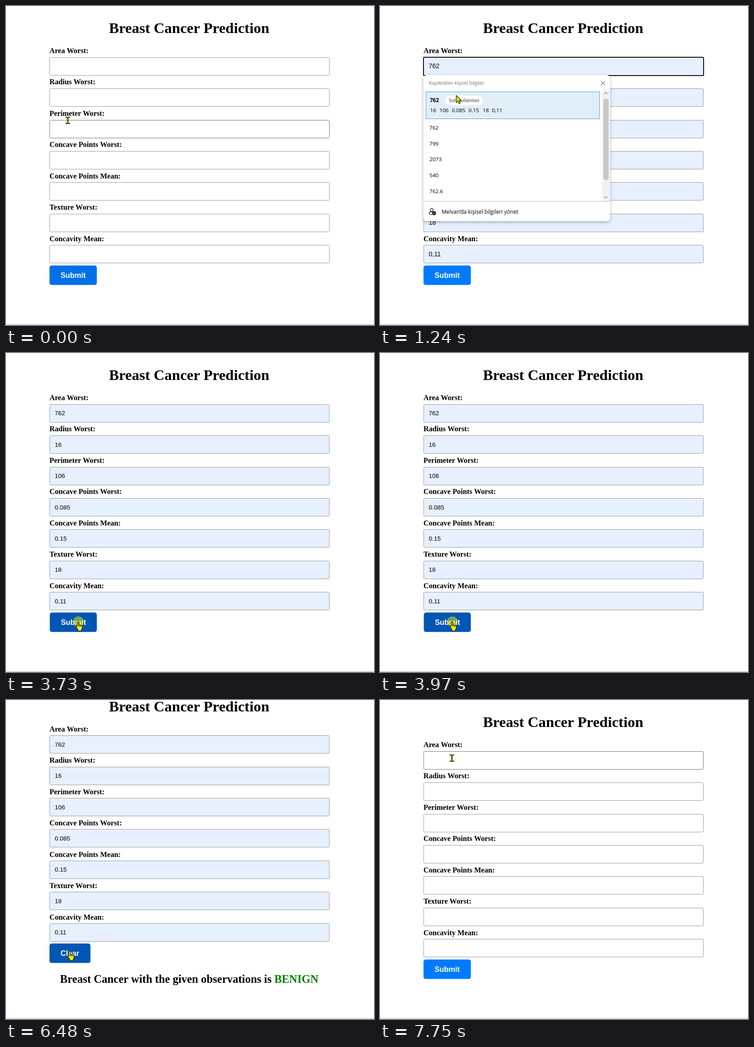
Recreate the animation shown at these times as an HTML page. Size 804 by 697 pixels, loop 8000 ms.

```html
<!DOCTYPE html>
<html lang="en">
<head>
<meta charset="utf-8">
<title>Breast Cancer Prediction</title>
<style>
  html, body { margin: 0; width: 100%; height: 100%; overflow: hidden; background: #fff; }
  svg { display: block; width: 804px; height: 697px; }
  .serif { font-family: "Liberation Serif", "Times New Roman", serif; font-weight: 700; fill: #000; }
  .sans { font-family: "Liberation Sans", Arial, sans-serif; }
  .ui { font-family: "Open Sans", "Noto Sans", sans-serif; font-size: 11.6px; fill: #000; }
  .button { font-size: 16.2px; font-weight: 700; fill: #fff; }
  .line { fill: none; stroke: #222; stroke-width: 1; }
</style>
</head>
<body>
<svg viewBox="0 0 804 697" xmlns="http://www.w3.org/2000/svg">
  <defs>
    <filter id="shadow" x="-10%" y="-10%" width="120%" height="120%">
      <feDropShadow dx="0" dy="2.5" stdDeviation="3.5" flood-opacity=".3"/>
    </filter>
  </defs>

  <text id="title" class="serif" x="400.2" text-anchor="middle" font-size="32.5">Breast Cancer Prediction</text>
  <g id="rows"></g>
  <g id="button">
    <rect x="95" width="103.5" height="42.6" rx="5"/>
    <text class="sans button" x="119.3" y="27"></text>
  </g>
  <text id="result" class="serif" x="400.4" y="618" text-anchor="middle" font-size="24.45">Breast Cancer with the given observations is <tspan fill="#008000">BENIGN</tspan></text>
  <rect y="695.5" width="804" height="1.5" fill="#c6c6c6"/>

  <g id="popup">
    <rect x="95" y="151" width="407.5" height="319" rx="7" fill="#fff" filter="url(#shadow)"/>
    <text class="ui" x="107" y="172" style="font-size:10.45px;fill:#707070">Kaydedilen kişisel bilgiler</text>
    <path class="line" d="M482.5 164l9 9m0-9l-9 9"/>
    <rect x="485" y="182" width="16.5" height="245" fill="#f1f1f1"/>
    <rect x="488" y="202.5" width="11.5" height="178" rx="5.5" fill="#c8c8c8"/>
    <path class="line" d="M490 192.2l3.5-3.5 3.5 3.5M490 416.3l3.5 3.5 3.5-3.5"/>
    <rect id="pick" x="100.5" y="187.5" width="379" height="59" fill="#e0eef7" stroke="#5a9bd0"/>
    <text class="ui" x="109" y="210" font-weight="700">762</text>
    <rect id="pill" x="142" y="196" width="83" height="21" rx="10.5"/>
    <text class="ui" x="150.5" y="210" style="font-size:9.8px;font-weight:600;fill:#606060">Son kullanılan</text>
    <g id="options"></g>
    <path d="M95 427h407.5" stroke="#d2d2d2" stroke-width="1.5"/>
    <g fill="none" stroke="#1b1b1b" stroke-width="1.3">
      <circle cx="113" cy="445.5" r="3.2"/>
      <path d="M113 456c-4 0-5.5-1.5-5.5-4.5 0-1 .5-1.5 1.5-1.5h4.5"/>
      <rect x="114.5" y="449.5" width="7" height="6.5" rx="1.5" fill="#1b1b1b"/>
      <path d="M116 453h4" stroke="#fff" stroke-width="1"/>
    </g>
    <text class="ui" x="134.5" y="453.5" style="font-size:11.75px">Melvan’da kişisel bilgileri yönet</text>
  </g>

  <circle id="click" r="11.5" fill="#e9ea00" fill-opacity=".5"/>
  <g id="cursor">
    <g id="beam">
      <path d="M-5 -8H-1L0 -7.5 1 -8H5V-5.5H1.6V5.5H5V8H-5V5.5H-1.6V-5.5H-5Z" fill="#262300"/>
      <path d="M-4 -6.7H4M0 -6V6M-4 6.7H4" stroke="#a39b16" stroke-width="1.1"/>
    </g>
    <path id="arrow" d="M0 0V15.5L3.7 12.2 6.3 18 9 16.8 6.5 11.2H11.5Z" fill="#d9f000" stroke="#1c1c00" stroke-width="1.2" stroke-linejoin="round"/>
    <g id="hand" stroke="#1c1c00" stroke-linejoin="round">
      <path d="M-1.5 1C-1.5 -1 1.5 -1 1.5 1V7L4 7.3 6.5 8 9 9C10 9.5 10 11 9.8 13L8 17V20H0V17L-4.5 11.5C-5.5 9.5 -3.5 8.5 -1.5 11Z" fill="#f3f000" stroke-width="1.2"/>
      <path d="M1.5 7V11M4.2 7.5V11M6.9 8.2V11" stroke-width="1"/>
    </g>
  </g>
</svg>
<script>
const NS = "http://www.w3.org/2000/svg";
const $ = id => document.getElementById(id);

function set(el, attrs) {
  for (const key in attrs) el.setAttribute(key, attrs[key]);
  return el;
}
function add(parent, tag, attrs, text = "") {
  const el = set(document.createElementNS(NS, tag), attrs);
  el.textContent = text;
  parent.append(el);
  return el;
}
const show = (el, on) => { el.style.display = on ? "" : "none"; };

const fields = [
  ["Area Worst:", "762"], ["Radius Worst:", "16"], ["Perimeter Worst:", "106"],
  ["Concave Points Worst:", "0.085"], ["Concave Points Mean:", "0.15"],
  ["Texture Worst:", "18"], ["Concavity Mean:", "0,11"]
];
const PITCH = 68.43, SCROLL = -34.5;
const rows = fields.map(([name, value]) => ({
  label: add($("rows"), "text", { class: "serif", x: 95, "font-size": 16.22 }, name),
  box: add($("rows"), "rect", { rx: 2 }),
  text: add($("rows"), "text", { class: "sans", x: 106.5 }, value)
}));

["762", "799", "2073", "540", "762.6"].forEach((v, i) =>
  add($("options"), "text", { class: "ui", x: 108, y: 270 + 34.7 * i }, v));
const savedX = [109.5, 130, 157, 193.5, 224.5, 244.5];
fields.slice(1).forEach(([, v], i) =>
  add($("options"), "text", { class: "ui", x: savedX[i], y: 232 }, v));

const BLUE = "#007bff", DARK = "#0056b3";

// [start ms, cursor shape, x, y, changes to the page]; changes persist
const steps = [
  [0, "beam", 135, 250, { fill: "#0070ea", hover: 2 }],
  [250, "beam", 150, 133, { fill: BLUE, hover: 0 }],
  [500, "beam", 152, 133, { focus: true, popup: true, hover: -1 }],
  [990, "arrow", 161, 191, { filled: true, preview: true }],
  [1240, "arrow", 166.5, 195.5, {}],
  [1490, "arrow", 168, 197, { click: true }],
  [1730, "beam", 172, 200, { popup: false, preview: false, click: false, hover: 1 }],
  [1970, "beam", 178, 140, { hover: -1 }],
  [2230, "beam", 182, 111, {}],
  [2480, "beam", 180, 190, { hover: 1 }],
  [2730, "beam", 172, 330, { hover: 3 }],
  [2980, "beam", 164, 480, { hover: 5 }],
  [3230, "hand", 157, 587, { hover: -1, fill: DARK }],
  [3470, "hand", 157, 587, { focus: false, click: true, pressed: true }],
  [3730, "hand", 157, 587, {}],
  [3980, "arrow", 157, 587, { done: true, fill: BLUE, click: false, pressed: false }],
  [4240, "arrow", 225, 590, {}],
  [4490, "beam", 335, 598, {}],
  [4730, "beam", 530, 614, {}],
  [4990, "arrow", 688, 633, {}],
  [5740, "beam", 500, 611, {}],
  [5990, "beam", 330, 602, {}],
  [6240, "arrow", 195, 572, {}],
  [6480, "hand", 139, 549, { fill: DARK }],
  [6990, "beam", 139, 554, { done: false, filled: false, hover: 6, pressed: true }],
  [7240, "beam", 143, 450, { fill: BLUE, hover: -1, pressed: false }],
  [7490, "beam", 151, 264, { hover: 2 }],
  [7750, "beam", 157, 127, { hover: 0 }]
];
const LOOP = 8000;
let page = {};
const states = steps.map(([, shape, x, y, change]) =>
  (page = { ...page, ...change, shape, x, y }));

function drawRow({ label, box, text }, i, s, scroll) {
  const focused = s.focus && i === 0;
  const inset = focused ? 0 : 0.5;
  const top = Math.round(111.7 + PITCH * i + scroll);
  set(label, { y: Math.round(103 + PITCH * i) + Math.ceil(scroll) });
  set(box, {
    x: 95 + inset, y: top + inset, width: 612 - 2 * inset, height: 40 - 2 * inset,
    fill: s.filled ? "#e7f0fe" : "#fff",
    stroke: focused ? "#101010" : s.hover === i ? "#757575" : "#9a9a9a",
    "stroke-width": focused ? 2 : 1
  });
  set(text, {
    y: Math.round(136.22 + PITCH * i + scroll),
    "font-size": s.preview ? 14 : 13.5
  });
  show(text, s.filled);
}

function draw(s) {
  const scroll = s.done ? SCROLL : 0;
  set($("title"), { y: 59 + Math.ceil(scroll) });
  rows.forEach((row, i) => drawRow(row, i, s, scroll));

  const [rect, label] = $("button").children;
  const width = s.done ? 89.5 : 103.5;
  const nudge = s.pressed ? 0.7 : 0;
  set(rect, { fill: s.fill, width: width - nudge });
  label.textContent = s.done ? "Clear" : "Submit";
  set($("button"), { transform: `translate(${nudge} ${Math.round(566.8 + scroll)})` });

  show($("result"), s.done);
  show($("popup"), s.popup);
  show($("pick"), s.preview);
  set($("pill"), { fill: s.preview ? "#fff" : "#f3f3f3" });
  show($("click"), s.click);
  set($("click"), { cx: s.x + 1, cy: s.y });
  for (const shape of ["beam", "arrow", "hand"]) show($(shape), s.shape === shape);
  set($("cursor"), { transform: `translate(${s.x} ${s.y})` });
}

let current = -1;
const begin = performance.now();
function tick() {
  const t = (performance.now() - begin) % LOOP;
  let i = steps.length - 1;
  while (steps[i][0] > t) i--;
  if (i !== current) draw(states[current = i]);
  requestAnimationFrame(tick);
}
tick();
</script>
</body>
</html>
```
